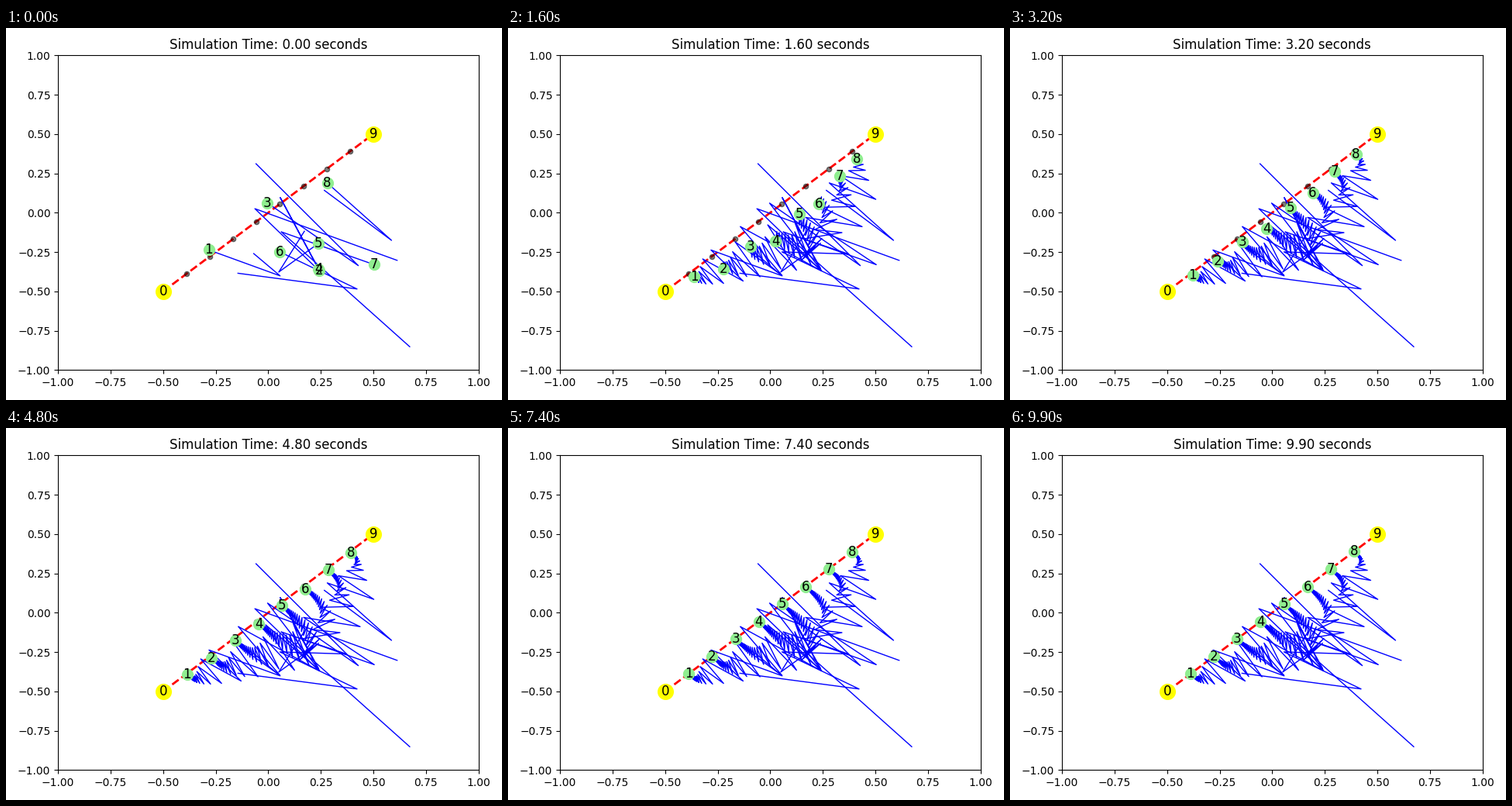
Recreate the animation shown at these times as a matplotlib script. Size 640 px wide and 480 px high, loop 10 s.

```python
import numpy as np
import matplotlib.pyplot as plt
from matplotlib.animation import FuncAnimation

FRAMES = 100
DT = 0.1
WARMUP = 2  # averaging steps already taken at time zero

# Fixed ends of the line, and where the free agents start out
ANCHORS = np.array([(-0.5, -0.5), (0.5, 0.5)])
SCATTER = [(-0.069, -0.26), (0.613, -0.303), (-0.058, 0.311), (0.244, -0.37),
           (0.172, -0.118), (-0.144, -0.385), (0.673, -0.852), (0.267, 0.142)]


def simulate(start, steps):
    """Each free agent jumps to the midpoint of its two neighbours."""
    path = [start]
    for _ in range(steps):
        pos = path[-1].copy()
        pos[1:-1] = (path[-1][:-2] + path[-1][2:]) / 2
        path.append(pos)
    return np.array(path)


start = np.vstack([ANCHORS[0], SCATTER, ANCHORS[1]])
path = simulate(start, FRAMES + WARMUP)
goal = np.linspace(*ANCHORS, len(start))

fig, ax = plt.subplots(figsize=(6.4, 4.8), dpi=100)
ax.set_xlim(-1, 1)
ax.set_ylim(-1, 1)
title = ax.set_title("Simulation Time: 0.00 seconds")
fig.tight_layout()
fig.subplots_adjust(top=0.9264)

ax.plot(*ANCHORS.T, "r--", lw=2, zorder=1)
ax.scatter(*goal[1:-1].T, s=20, c="black", alpha=0.5, zorder=1.5)
trails = [ax.plot([], [], "b-", lw=1, zorder=2)[0] for _ in SCATTER]
ax.scatter(*ANCHORS.T, s=200, c="yellow", zorder=2.5)
agents = ax.scatter(*start[1:-1].T, s=100, c="lightgreen", zorder=2.5)
labels = [ax.text(x, y, str(i), size=12, ha="center", va="center", zorder=3)
          for i, (x, y) in enumerate(start)]


def update(frame):
    step = frame + WARMUP
    title.set_text(f"Simulation Time: {frame * DT:.2f} seconds")
    agents.set_offsets(path[step, 1:-1])
    for i, trail in enumerate(trails, 1):
        trail.set_data(*path[:step + 1, i].T)
    for label, pos in zip(labels, path[step]):
        label.set_position(pos)
    return [title, agents, *trails, *labels]


anim = FuncAnimation(fig, update, frames=FRAMES, interval=1000 * DT,
                     repeat=True, repeat_delay=0, blit=False)
plt.show()
```
